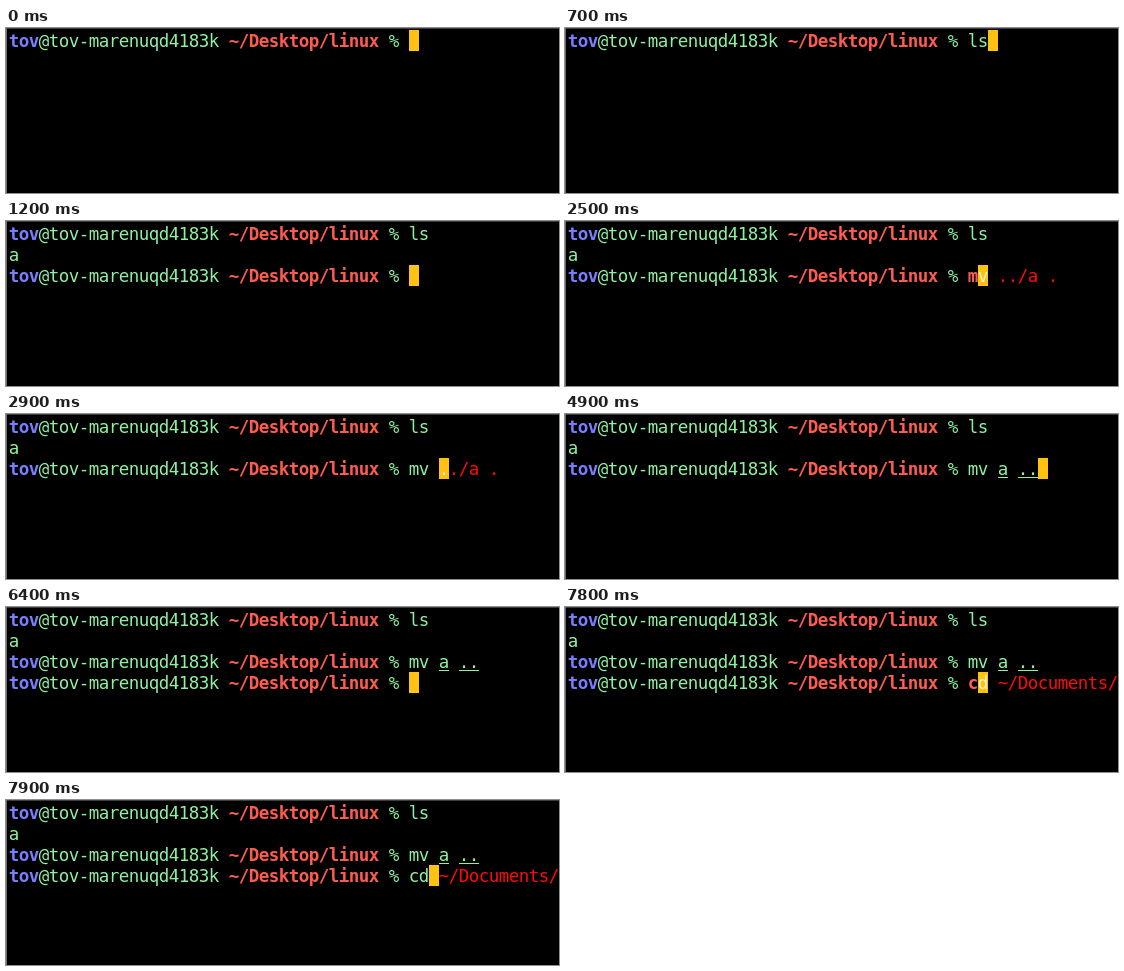
An HTML page with a canvas for the animation above (8 s loop, 553x165 px).

```html
<!DOCTYPE html>
<html lang="en">
<head>
<meta charset="utf-8">
<title>Terminal session</title>
<style>
  html, body { margin: 0; width: 100%; height: 100%; overflow: hidden; background: #000; }
  canvas { display: block; }
</style>
</head>
<body>
<canvas id="term" width="553" height="165"></canvas>
<script>
const ctx = document.getElementById('term').getContext('2d');
const LOOP = 8000, CELL = 10, ROW = 21, LEFT = 3, TOP = 2, BASE = 17;
const FONT = '17.5px "DejaVu Sans Mono", "Noto Sans Mono", monospace';
const GREEN = '#8ff0a0', BLUE = '#7a7dff', CORAL = '#ff5c50', RED = '#ff0a0a',
      AMBER = '#ffc211', PALE = '#fff3d0', EDGE_TOP = '#3c3c3c', EDGE_LEFT = '#6e6e6e';

const USER = 'tov', HOST = '@tov-marenuqd4183k', PATH = '~/Desktop/linux';
const INPUT = 40;

// Text typed on each prompt row: [time, typed, suggestion, valid command]
const prompts = [
  { row: 0, start: 0, end: 1100, keys: [
    [400, 'l', 's', true], [700, 'ls', '', true]] },
  { row: 2, start: 1200, end: 6400, keys: [
    [2500, 'm', 'v ../a .', false], [2800, 'mv', ' ../a .', true],
    [2900, 'mv ', '../a .', true], [3200, 'mv a', ' ..', true],
    [3900, 'mv a ', '..', true], [4600, 'mv a .', '.', true],
    [4900, 'mv a ..', '', true]] },
  { row: 3, start: 6400, end: LOOP, keys: [
    [7800, 'c', 'd ~/Documents/', false], [7900, 'cd', ' ~/Documents/', true]] }
];

function print(text, col, row, color, bold) {
  ctx.font = (bold ? 'bold ' : '') + FONT;
  ctx.fillStyle = color;
  [...text].forEach((ch, i) =>
    ctx.fillText(ch, LEFT + (col + i + 0.5) * CELL, TOP + row * ROW + BASE));
}

function cursor(col, row, ch = '') {
  ctx.fillStyle = AMBER;
  ctx.fillRect(LEFT + col * CELL, TOP + row * ROW, CELL, ROW);
  print(ch, col, row, PALE);
}

function underline(col, row, count) {
  ctx.fillStyle = GREEN;
  ctx.fillRect(LEFT + col * CELL, TOP + row * ROW + BASE + 2, count * CELL, 1);
}

function drawPrompt({ row, start, end, keys }, t) {
  if (t < start) return;
  print(USER, 0, row, BLUE, true);
  print(HOST, 3, row, GREEN);
  print(PATH, 22, row, CORAL, true);
  print('%', 38, row, GREEN);

  const [, typed, hint, valid] =
    keys.filter(k => t >= k[0]).pop() || [0, '', '', true];
  print(typed, INPUT, row, valid ? GREEN : CORAL, !valid);

  // Existing paths among the arguments are underlined
  let col = INPUT;
  typed.split(' ').forEach((word, i) => {
    if (i && word) underline(col, row, word.length);
    col += word.length + 1;
  });

  if (t < end) {
    const at = INPUT + typed.length;
    print(hint.slice(1), at + 1, row, RED);
    cursor(at, row, hint.slice(0, 1));
  }
}

function draw(t) {
  ctx.fillStyle = '#000';
  ctx.fillRect(0, 0, 553, 165);
  ctx.fillStyle = EDGE_TOP;
  ctx.fillRect(0, 0, 553, 1);
  ctx.fillStyle = EDGE_LEFT;
  ctx.fillRect(0, 0, 1, 165);
  ctx.textAlign = 'center';
  ctx.textBaseline = 'alphabetic';
  prompts.forEach(p => drawPrompt(p, t));
  if (t >= 1200) print('a', 0, 1, GREEN);
  else if (t >= 1100) cursor(0, 1);
}

const begin = performance.now();
function tick() {
  draw((performance.now() - begin) % LOOP);
  requestAnimationFrame(tick);
}
tick();
</script>
</body>
</html>
```
